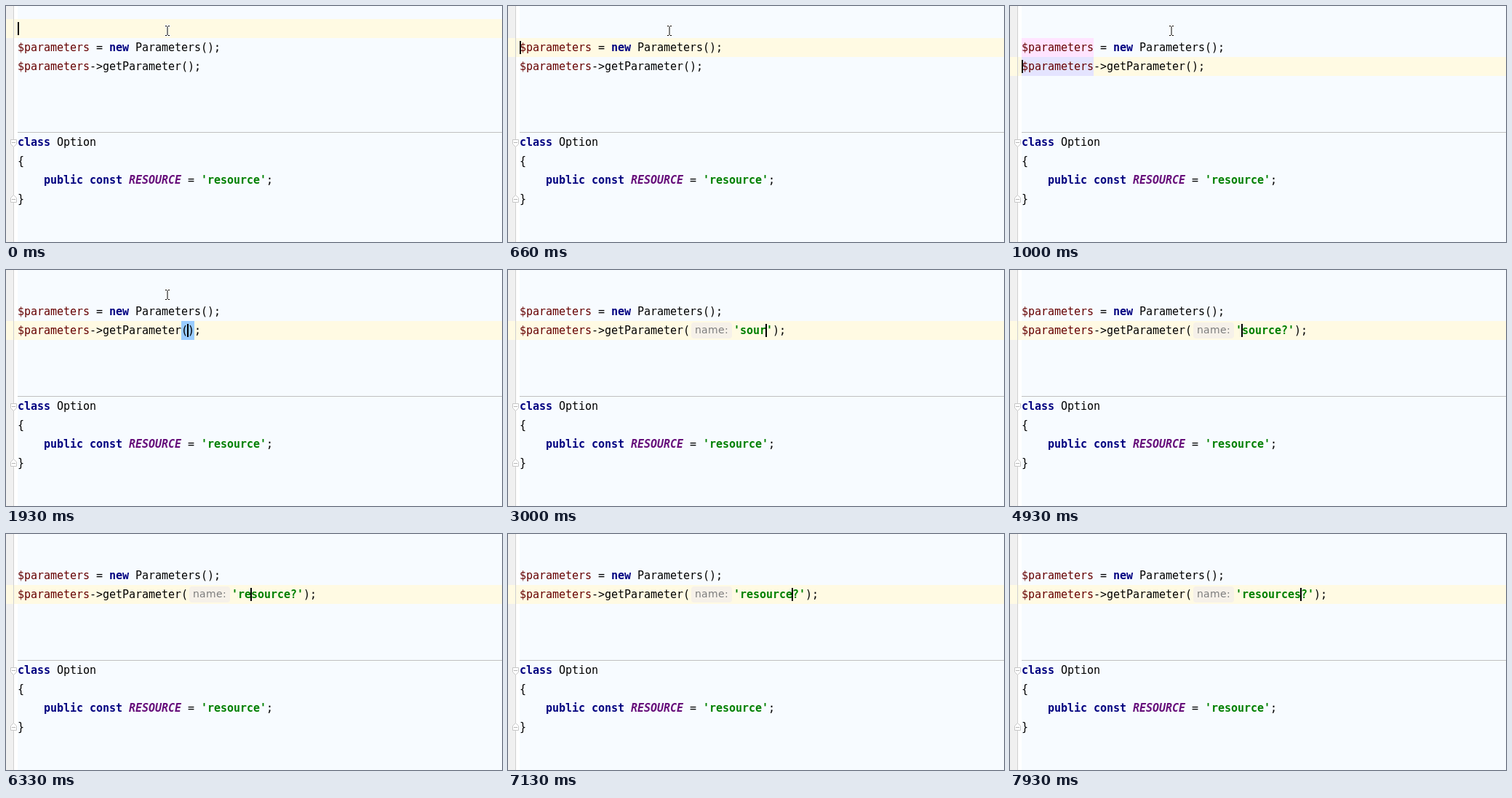
An HTML page with a canvas that plays this animation: 682 by 324 pixels, repeating every 8 s.

```html
<!DOCTYPE html>
<html lang="en">
<head>
<meta charset="utf-8">
<title>Code editor</title>
<style>
  html, body { margin: 0; width: 100%; height: 100%; overflow: hidden; background: #f7fbff; }
  canvas { display: block; }
</style>
</head>
<body>
<canvas id="stage" width="682" height="324"></canvas>
<script>
const ctx = document.getElementById('stage').getContext('2d');
const LOOP = 8000, WIDTH = 682, HEIGHT = 324;
const LEFT = 16, CELL = 9, ROW = 26, TOP = 18;
const MONO = '15px "DejaVu Sans Mono", monospace';
const STYLES = {
  plain: ['', '#000000'],
  variable: ['', '#660000'],
  keyword: ['bold ', '#000080'],
  string: ['bold ', '#008000'],
  constant: ['italic bold ', '#660e7a']
};
const CALL = '$parameters->getParameter(';
const ARG = CALL.length;
const HINT_AT = 2530, HINT_WIDTH = 60;

// Each key press stores the editor state that follows it.
const states = [{ at: 0, row: 0, col: 0, text: '' }];
const press = (at, change) => {
  const last = states[states.length - 1];
  states.push({ ...last, at, ...change(last) });
};
const move = (at, step) => press(at, s => ({ col: s.col + step }));
const type = (at, char) => press(at, s => {
  const i = s.col - ARG;
  return { text: s.text.slice(0, i) + char + s.text.slice(i), col: s.col + 1 };
});

press(470, () => ({ row: 1 }));
press(670, () => ({ row: 2 }));
press(1270, () => ({ col: ARG + 2 }));
move(1470, -1);
move(1600, -1);
press(2330, () => ({ text: "''", col: ARG + 1 }));
[...'source'].forEach((c, i) => type(2600 + i * 120, c));
type(3600, '?');
for (let i = 0; i < 7; i++) move(4130 + i * 100, -1);
type(5730, 'r');
type(5880, 'e');
for (let i = 0; i < 6; i++) move(6400 + i * 100, 1);
type(7470, 's');

const rowTop = row => TOP + row * ROW;

function rect(x, y, w, h, color) {
  ctx.fillStyle = color;
  ctx.fillRect(x, y, w, h);
}

function write(x, row, str, style = 'plain') {
  const [weight, color] = STYLES[style];
  ctx.font = weight + MONO;
  ctx.fillStyle = color;
  [...str].forEach((c, i) => ctx.fillText(c, x + i * CELL, rowTop(row) + 18));
  return x + str.length * CELL;
}

function writeLine(row, ...parts) {
  return parts.reduce((x, [str, style]) => write(x, row, str, style), LEFT);
}

function foldMark(y, dir) {
  ctx.beginPath();
  ctx.moveTo(6.5, y - 5 * dir);
  ctx.lineTo(14.5, y - 5 * dir);
  ctx.lineTo(14.5, y + dir);
  ctx.lineTo(10.5, y + 5 * dir);
  ctx.lineTo(6.5, y + dir);
  ctx.closePath();
  ctx.fillStyle = '#ffffff';
  ctx.fill();
  ctx.strokeStyle = '#c6c6c6';
  ctx.lineWidth = 1;
  ctx.stroke();
  rect(8, Math.floor(y - dir), 5, 1, '#b4b4b4');
}

function hint() {
  const x = LEFT + ARG * CELL, y = rowTop(2);
  ctx.beginPath();
  ctx.roundRect(x + 2, y + 2, HINT_WIDTH - 4, 22, 4);
  ctx.fillStyle = '#f6f1e9';
  ctx.fill();
  ctx.font = '14px "DejaVu Sans", sans-serif';
  ctx.fillStyle = '#7d7d7d';
  let pen = x + 7;
  for (const c of 'name:') {
    ctx.fillText(c, pen, y + 17);
    pen += Math.round(ctx.measureText(c).width);
  }
}

function pointer() {
  const beam = (grow, color) => {
    for (const [x, y, w, h] of [[219, 27, 2, 1], [223, 27, 2, 1], [221.5, 28, 1, 12], [219, 40, 2, 1], [223, 40, 2, 1]]) {
      rect(x - grow, y - grow, w + 2 * grow, h + 2 * grow, color);
    }
  };
  beam(1, 'rgb(255, 255, 255)');
  beam(0, '#000000');
}

function draw(t) {
  const s = states.findLast(state => state.at <= t);
  const hinted = s.text && t >= HINT_AT;
  const shift = hinted ? HINT_WIDTH : 0;

  rect(0, 0, WIDTH, HEIGHT, '#f7fbff');
  rect(0, 0, 10, HEIGHT, '#f0f0f0');
  rect(11, 0, 5, HEIGHT, '#ffffff');
  rect(0, rowTop(s.row), WIDTH, ROW, '#fffae3');
  rect(10, 0, 1, HEIGHT, '#d0d0d0');
  rect(LEFT, 173, WIDTH - LEFT, 1, '#c0c0c0');

  if (s.col === 0 && s.row > 0 && t - s.at > 200) {
    rect(LEFT, rowTop(1), 11 * CELL, ROW, '#ffe4ff');
    rect(LEFT, rowTop(2), 11 * CELL, ROW, '#e4e4ff');
  }
  if (!s.text && (s.col === ARG || s.col === ARG + 1)) {
    rect(LEFT + (ARG - 1) * CELL, rowTop(2), 2 * CELL, ROW, '#99ccff');
  }

  writeLine(1, ['$parameters', 'variable'], [' = '], ['new', 'keyword'], [' Parameters();']);
  const end = writeLine(2, ['$parameters', 'variable'], ['->getParameter(']);
  if (hinted) hint();
  write(write(end + shift, 2, s.text, 'string'), 2, ');');

  writeLine(6, ['class', 'keyword'], [' Option']);
  writeLine(7, ['{']);
  writeLine(8, ['    public const ', 'keyword'], ['RESOURCE', 'constant'], [' = '], ["'resource'", 'string'], [';']);
  writeLine(9, ['}']);
  foldMark(188.5, 1);
  foldMark(264.5, -1);

  if ((t - s.at) % 1000 < 500) {
    const x = s.col ? LEFT + s.col * CELL + shift - 1 : LEFT;
    rect(x, rowTop(s.row) + 4, 2, 18, '#000000');
  }
  if (!s.text) pointer();
}

const start = performance.now();
function tick() {
  draw((performance.now() - start) % LOOP);
  requestAnimationFrame(tick);
}
tick();
</script>
</body>
</html>
```
